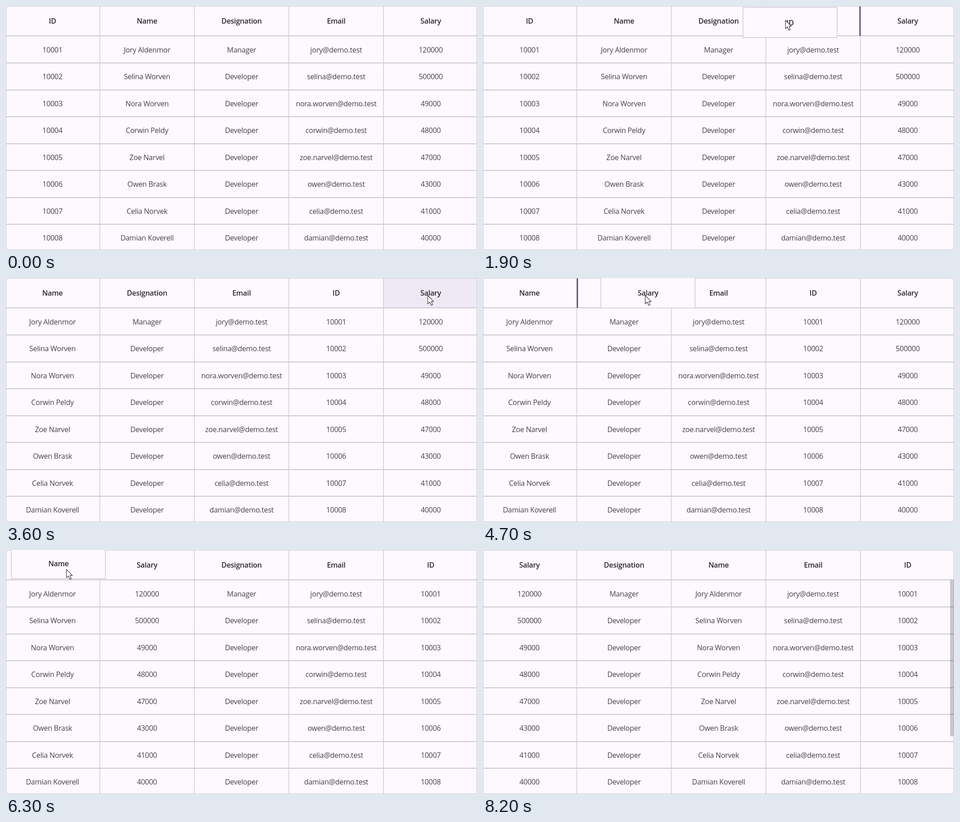
An HTML page for the animation above (8.3 s loop, 1038x540 px).

```html
<!DOCTYPE html>
<html lang="en">
<head>
<meta charset="utf-8">
<title>Column drag and drop</title>
<style>
  html, body { margin: 0; width: 100%; height: 100%; overflow: hidden; background: #fef9fe; }
  svg { display: block; width: 1038px; height: 540px; }
  text {
    font: 400 16px "Open Sans", "Noto Sans", sans-serif;
    letter-spacing: -.3px; fill: #454248; text-anchor: middle;
  }
  .head { font-weight: 600; fill: #2c2930; }
  .line { fill: #cdc8d2; }
  .hover { fill: #efe9f5; }
  .marker { fill: #453e78; }
  .card { fill: #fef9fe; stroke: #cbc6d0; stroke-width: 1.4; }
  .thumb { fill: #1d1b20; fill-opacity: .24; }
  .cursor { fill: #fff; stroke: #3c3a40; stroke-width: 1.2; stroke-linejoin: round; }
</style>
</head>
<body>
<svg id="stage" viewBox="0 0 1038 540"></svg>
<script>
const LOOP = 8300, STEP = 100, REST = 400;
const WIDTH = 1038, HEIGHT = 540, COL = 208.4, ROW = 59.55, HEAD = 66;

const titles = ['ID', 'Name', 'Designation', 'Email', 'Salary'];
const people = [
  ['Jory Aldenmor', 'jory', 120000],
  ['Selina Worven', 'selina', 500000],
  ['Nora Worven', 'nora.worven', 49000],
  ['Corwin Peldy', 'corwin', 48000],
  ['Zoe Narvel', 'zoe.narvel', 47000],
  ['Owen Brask', 'owen', 43000],
  ['Celia Norvek', 'celia', 41000],
  ['Damian Koverell', 'damian', 40000]
].map(([name, user, pay], i) =>
  [10001 + i, name, i ? 'Developer' : 'Manager', user + '@demo.test', pay]);

// Each drag moves a column between slots; hold is the pointer's height inside the card.
const drags = [
  { from: 0, to: 3, start: 1000, arrive: 1900, drop: 2300, press: [93, 31], reach: [666, 31], hold: 28 },
  { from: 4, to: 1, start: 3800, arrive: 4700, drop: 5100, press: [929, 38], reach: [357, 38], hold: 38.5 },
  { from: 0, to: 2, start: 6170, arrive: 7400, drop: 7700, press: [121, 42], reach: [497, 54], hold: 46 }
];
const cursorPath = [
  { at: 200, point: [60, -30] },
  ...drags.flatMap(d => [
    { at: d.start - REST, point: d.press },
    { at: d.start, point: d.press },
    { at: d.arrive, point: d.reach },
    { at: d.drop, point: d.reach }
  ]),
  { at: 8100, point: [1050, 90] }
];

const stage = document.getElementById('stage');
function add(tag, attrs, parent = stage, content = '') {
  const node = document.createElementNS('http://www.w3.org/2000/svg', tag);
  for (const key in attrs) node.setAttribute(key, attrs[key]);
  node.textContent = content;
  parent.append(node);
  return node;
}
const rect = (cls, x, y, width, height, parent) =>
  add('rect', { class: cls, x, y, width, height }, parent);
const move = (node, x, y) => node.setAttribute('transform', `translate(${x} ${y})`);
const show = (node, on) => node.setAttribute('visibility', on ? 'visible' : 'hidden');
const edge = i => COL * i - 1.8;
const ease = p => p * p * (3 - 2 * p);

function cursorAt(t) {
  const next = cursorPath.findIndex(key => key.at > t);
  if (next === 0) return cursorPath[0].point;
  if (next < 0) return cursorPath.at(-1).point;
  const a = cursorPath[next - 1], b = cursorPath[next];
  const k = ease((t - a.at) / (b.at - a.at));
  return a.point.map((v, i) => v + (b.point[i] - v) * k);
}

const hover = rect('hover', 0, 0, COL, HEAD);
const columns = titles.map((title, c) => {
  const group = add('g', {});
  add('text', { class: 'head', y: 39.2 }, group, title);
  people.forEach((person, r) => add('text', { y: 102.6 + ROW * r }, group, person[c]));
  return group;
});

people.forEach((_, r) => rect('line', 0, Math.round(65.4 + ROW * r), WIDTH, 2));
for (let c = 1; c < titles.length; c++) rect('line', edge(c) - .7, 0, 1.4, HEIGHT);
for (const y of [0, HEIGHT - 1]) rect('line', 0, y, WIDTH, 1);
for (const x of [0, WIDTH - 1]) rect('line', x, 0, 1, HEIGHT);

const thumb = rect('thumb', 1029.5, 66.5, 8, 346);
thumb.setAttribute('rx', 3);
const marker = rect('marker', 0, 1, 2.5, 65);
const card = add('g', {});
rect('card', 0, 0, 207.5, 67, card);
const cardTitle = add('text', { class: 'head', x: 104, y: 39.8 }, card);
const cursor = add('path', {
  class: 'cursor',
  d: 'M.5 .5V19.2L4.9 15.2L8 22.6L11.2 21.3L8.2 14.1H13.6Z'
});

function render(t) {
  const order = [...titles.keys()];
  for (const d of drags) {
    if (t >= d.drop) order.splice(d.to, 0, order.splice(d.from, 1)[0]);
  }
  order.forEach((c, slot) => move(columns[c], edge(slot) + COL / 2, 0));

  const [x, y] = cursorAt(t);
  const slot = Math.max(0, Math.min(4, Math.floor((x + 1.8) / COL)));
  const drag = drags.find(d => t >= d.start && t < d.drop);
  move(cursor, x, y);
  hover.setAttribute('x', edge(slot));
  show(hover, !drag && x < WIDTH && y >= 0 && y < HEAD);

  show(card, drag);
  show(marker, drag && slot !== drag.from);
  if (drag) {
    move(card, Math.max(0, edge(drag.from)) + x - drag.press[0], y - drag.hold);
    cardTitle.textContent = titles[order[drag.from]];
    marker.setAttribute('x', slot > drag.from ? edge(slot + 1) - 2.2 : edge(slot) + .2);
  }
  show(thumb, t >= 8000);
}

const begin = performance.now();
function tick() {
  const t = (performance.now() - begin) % LOOP;
  render(Math.floor(t / STEP) * STEP);
  requestAnimationFrame(tick);
}
tick();
</script>
</body>
</html>
```
